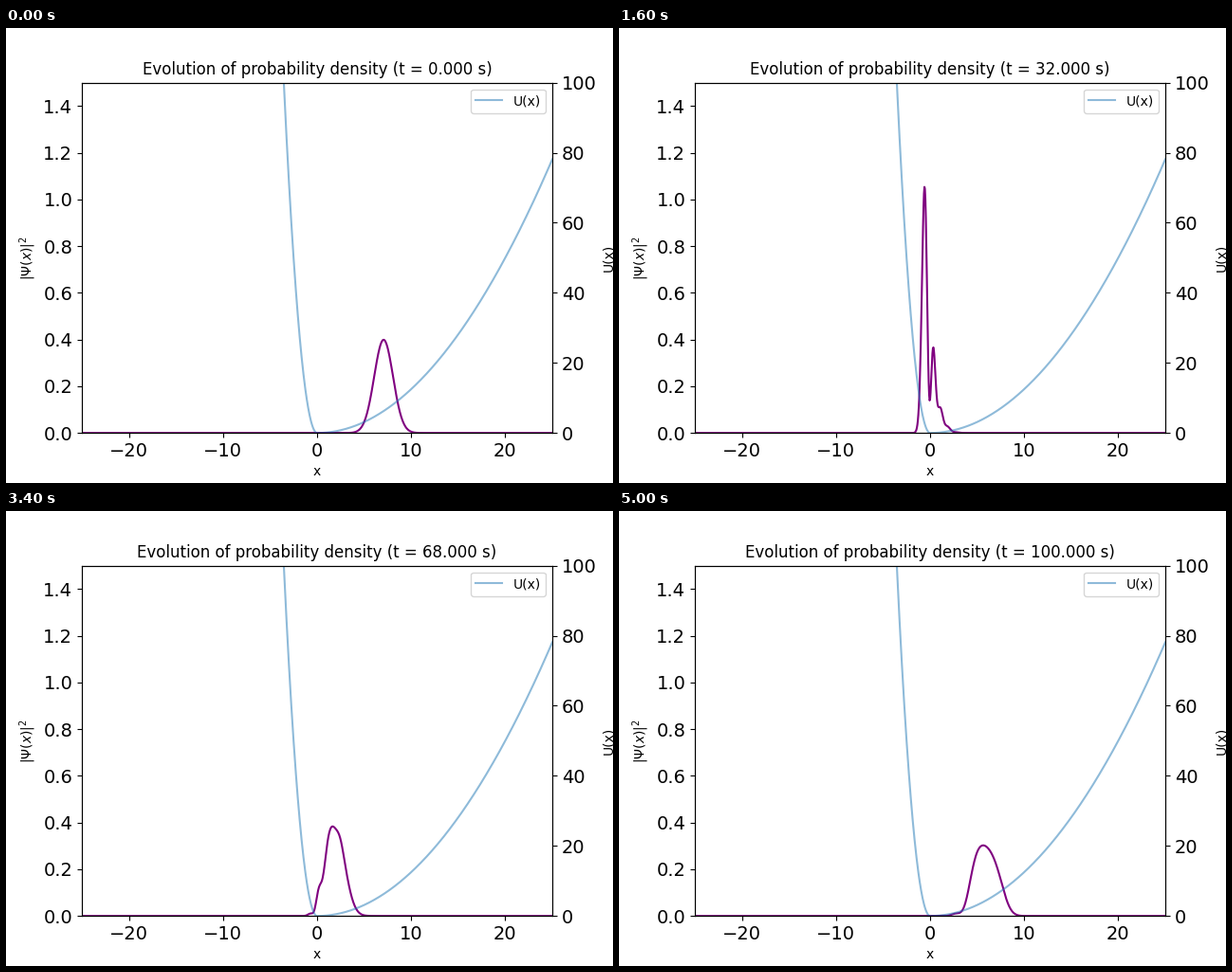
These frames come from a looping animation (640x480 px, 5020 ms). A matplotlib script:

```python
import numpy as np
import matplotlib.pyplot as plt
from matplotlib.animation import FuncAnimation

# Split harmonic well, units hbar = m = 1
W_LEFT, W_RIGHT = 4.0, 0.5
X0 = 5 * np.sqrt(2)
DT = 0.5
FRAMES = 201

x = np.linspace(-25, 25, 1001)
dx = x[1] - x[0]
U = 0.5 * np.where(x < 0, W_LEFT, W_RIGHT) ** 2 * x**2


def hamiltonian():
    """Sinc-basis kinetic energy plus the potential on the grid."""
    i = np.arange(x.size)
    d = i[:, None] - i[None, :]
    sign = 1.0 - 2.0 * (np.abs(d) % 2)
    kinetic = sign / (dx**2 * np.where(d == 0, 1, d) ** 2)
    np.fill_diagonal(kinetic, np.pi**2 / (6 * dx**2))
    return kinetic + np.diag(U)


# Coherent state of the right-hand well, expanded in eigenstates
energy, states = np.linalg.eigh(hamiltonian())
psi0 = (W_RIGHT / np.pi) ** 0.25 * np.exp(-W_RIGHT * (x - X0) ** 2 / 2)
coeff = states.T @ psi0
keep = np.abs(coeff) > 1e-9
energy, states, coeff = energy[keep], states[:, keep], coeff[keep]


def density(t):
    return np.abs(states @ (coeff * np.exp(-1j * energy * t))) ** 2


plt.rcParams.update({
    "font.family": "DejaVu Sans",
    "font.size": 10,
    "xtick.labelsize": 14,
    "ytick.labelsize": 14,
})

fig, ax = plt.subplots(figsize=(6.4, 4.8), dpi=100)
ax.set(xlim=(-25, 25), ylim=(0, 1.5), xlabel="x", ylabel=r"$|\Psi(x)|^2$")
wave, = ax.plot(x, density(0), color="purple")
title = ax.set_title("")

ax_u = ax.twinx()
ax_u.plot(x, U, color="C0", alpha=0.5, label="U(x)")
ax_u.set(ylim=(0, 100), ylabel="U(x)")
ax_u.legend(loc="upper right")


def update(i):
    t = i * DT
    wave.set_ydata(density(t))
    title.set_text(f"Evolution of probability density (t = {t:.3f} s)")
    return wave, title


anim = FuncAnimation(fig, update, frames=FRAMES, interval=25,
                     repeat=True, repeat_delay=0, blit=False)
plt.show()
```
